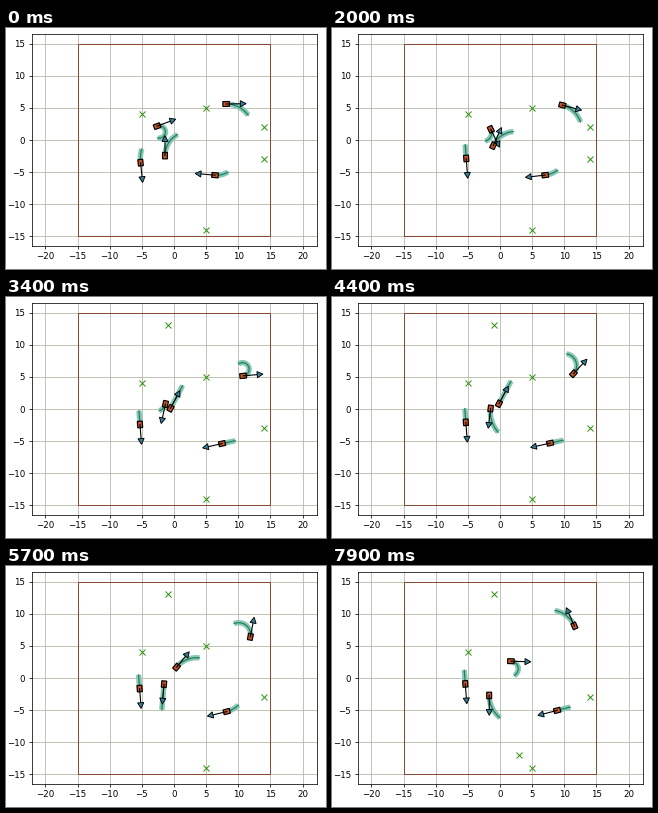
These frames come from a looping animation (320x241 px, 8 s). A matplotlib script:

```python
import numpy as np
import matplotlib.pyplot as plt
from matplotlib.animation import FuncAnimation
from matplotlib.patches import Polygon

W, H, DPI = 320, 241, 100
PX = 72 / DPI            # points per pixel
UNIT = 6.43              # pixels per metre
CX, CY = 168, 112        # pixel of the world origin
LEFT, RIGHT, TOP, BOTTOM = 25.5, 310.5, 5.9, 217.6

STEP = 100               # ms per frame
FRAMES = 80
DT = 0.01                # s, integration step
# the simulation redraws about every quarter of a second
TICKS = np.round(2.48 * np.arange(33) - 0.25).astype(int).clip(0)

FIXED_GOALS = [(-5, 4), (14, -3), (5, -14)]
# a reached goal jumps to a new place: old, new, frame of the jump
MOVED_GOALS = [((14, 2), (-1, 13), 30), ((5, 5), (3, -12), 69)]

BODY = [(-0.5, -0.38), (0.5, -0.38), (0.5, 0.38), (-0.5, 0.38)]
HEAD = [(2.2, -0.48), (3.1, 0), (2.2, 0.48)]
SHAFT = [(0, 0), (2.2, 0)]


def place(local, x, y, angle):
    """Turn local points by angle and move them to (x, y)."""
    c, s = np.cos(angle), np.sin(angle)
    return np.asarray(local) @ np.array([[c, s], [-s, c]]) + (x, y)


def arc(length, turn):
    """Path of constant curvature leaving the origin along x."""
    a = np.linspace(0, turn, 40)
    if abs(turn) < 1e-3:
        return np.column_stack([np.linspace(0, length, 40), 0 * a])
    r = length / turn
    return np.column_stack([r * np.sin(a), r * (1 - np.cos(a))])


class Robot:
    """Follows its planned arcs; a plan entry is (second, turn[, reach])."""

    def __init__(self, ax, z, x, y, heading, reach, horizon, plan):
        self.starts = [p[0] for p in plan]
        self.plan = [(p[2] if len(p) > 2 else reach, np.radians(p[1])) for p in plan]

        time = np.arange(0, FRAMES * STEP / 1000, DT)
        now = np.searchsorted(self.starts, time, side="right") - 1
        speed, rate = np.array(self.plan)[now].T / horizon
        angle = np.radians(heading) + np.cumsum(rate) * DT
        self.track = np.column_stack([x + np.cumsum(speed * np.cos(angle)) * DT,
                                      y + np.cumsum(speed * np.sin(angle)) * DT,
                                      angle])

        self.band, = ax.plot([], [], color="#88c6b8", lw=5.4 * PX, zorder=3,
                             solid_capstyle="butt")
        self.path, = ax.plot([], [], color="#1f8055", lw=1.2 * PX, zorder=4)
        self.shaft, = ax.plot([], [], color="black", lw=1.1 * PX, zorder=z + 0.1)
        self.body = ax.add_patch(Polygon(BODY, fc="#c8562c", ec="black",
                                         lw=1.2 * PX, zorder=z))
        self.head = ax.add_patch(Polygon(HEAD, fc="#357f98", ec="black",
                                         lw=0.9 * PX, zorder=z + 0.2))

    def update(self, t):
        pose = self.track[int(round(t / DT))]
        reach, turn = self.plan[np.searchsorted(self.starts, t, side="right") - 1]
        route = place(arc(reach, turn), *pose).T
        self.band.set_data(*route)
        self.path.set_data(*route)
        self.shaft.set_data(*place(SHAFT, *pose).T)
        self.body.set_xy(place(BODY, *pose))
        self.head.set_xy(place(HEAD, *pose))


fig = plt.figure(figsize=(W / DPI, H / DPI), dpi=DPI, facecolor="white")
ax = fig.add_axes([LEFT / W, 1 - BOTTOM / H, (RIGHT - LEFT) / W, (BOTTOM - TOP) / H])
ax.set_xlim((LEFT - CX) / UNIT, (RIGHT - CX) / UNIT)
ax.set_ylim((CY - BOTTOM) / UNIT, (CY - TOP) / UNIT)
ax.set_xticks(range(-20, 21, 5))
ax.set_yticks(range(-15, 16, 5))
ax.set_axisbelow(True)
ax.grid(color="#b0b0a0", lw=0.75 * PX)
ax.tick_params(labelsize=8.7 * PX, length=3.2 * PX, width=0.75 * PX, pad=3.2 * PX,
               labelfontfamily="DejaVu Sans")
for spine in ax.spines.values():
    spine.set_linewidth(0.75 * PX)

ax.plot([-15, 15, 15, -15, -15], [-15, -15, 15, 15, -15], color="#8a4a32", lw=PX, zorder=2)
goals, = ax.plot([], [], "x", color="#2f9414", ms=6 * PX, mew=PX, zorder=2.5)

robots = [
    Robot(ax, 5, 8.1, 5.6, 1, 4, 5,
          [(0, -56), (0.5, 0), (1.1, -56), (2.75, 212, 3.8), (4.38, 124), (6.5, 55)]),
    Robot(ax, 6, 6.38, -5.47, 175, -2.1, 6.5,
          [(0, 38), (1.7, 31), (3.3, 0), (5.5, 31), (5.9, 0)]),
    Robot(ax, 7, -5.2, -3.53, -84, -2.15, 6.5, [(0, -22), (0.5, 0)]),
    Robot(ax, 8, -2.64, 2.15, 21, 4, 5,
          [(0, -215, 3.6), (1.95, -102, 2.3), (2.2, -150, 3.6), (3.3, -62, 1.5),
           (3.6, 49), (4.6, 0), (7.4, 51)]),
    Robot(ax, 9, -1.4, -2.44, 90, 4, 5,
          [(0, -61), (2.3, 0), (4.7, -57), (5.95, 0), (6.75, -220, 3.6),
           (7.8, -150, 3.1)]),
]


def draw(frame):
    tick = TICKS[TICKS <= frame][-1]
    moved = [new if tick >= jump else old for old, new, jump in MOVED_GOALS]
    goals.set_data(*zip(*FIXED_GOALS, *moved))
    for robot in robots:
        robot.update(tick * STEP / 1000)
    return []


anim = FuncAnimation(fig, draw, frames=FRAMES, interval=STEP, repeat=True,
                     repeat_delay=0, blit=False)
plt.show()
```
